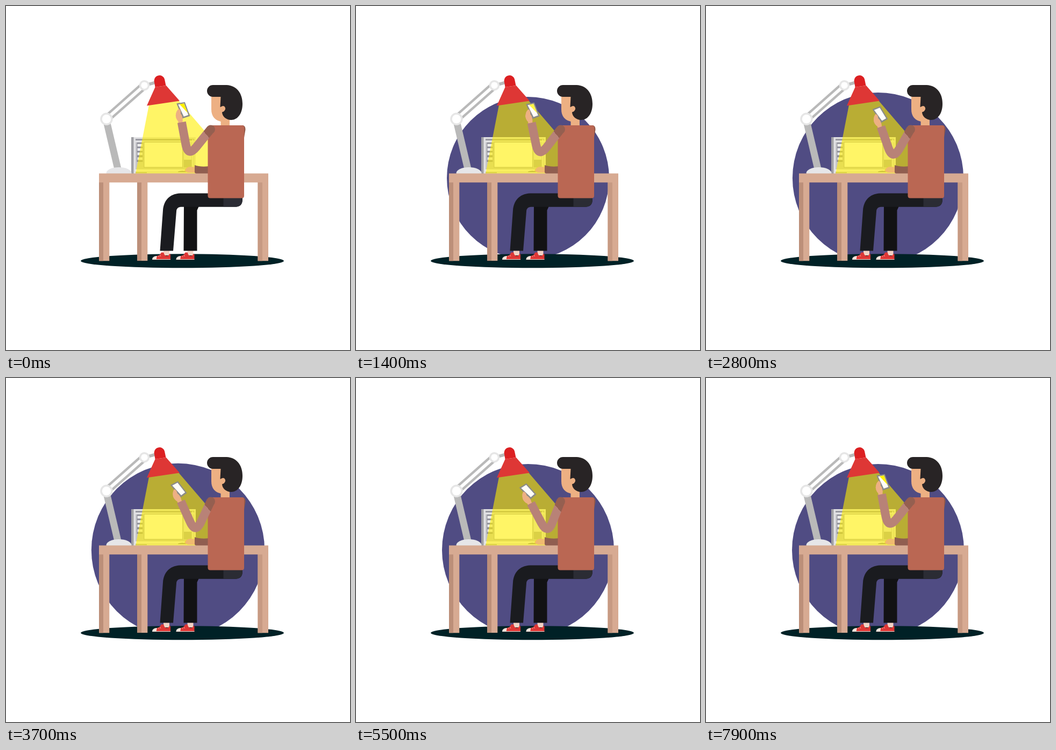
These frames come from a looping animation (640x640 px, 8000 ms). An HTML page:

```html
<!DOCTYPE html>
<html lang="en">
<head>
<meta charset="utf-8">
<title>Working at a desk</title>
<style>
html, body { margin: 0; width: 100%; height: 100%; overflow: hidden; background: #fff; }
svg { display: block; width: 100vw; height: 100vh; }
</style>
</head>
<body>
<svg viewBox="0 0 640 640">
  <defs>
    <linearGradient id="sleeve" gradientUnits="userSpaceOnUse" x1="362" y1="255" x2="390" y2="231">
      <stop offset=".5" stop-color="#b88277"/>
      <stop offset=".5" stop-color="#955f50"/>
    </linearGradient>
    <g id="shoe">
      <path d="M293 455H304V464H293Z" fill="#f3d3c4"/>
      <path d="M279 466L286 463L289 458.5H293.5Q294 465 299 465Q303 465 304 461L306 462V472H275Z" fill="#de3735"/>
      <path d="M272 471.500Q272 465.500 281 465L279.500 471.500Z" fill="#f6e4dc"/>
      <path d="M272 471.500H306" stroke="#f6e4dc"/>
      <path d="M283 464.500L285 467M286 463L288 466" stroke="#f6c9c2" stroke-width=".8"/>
    </g>
  </defs>

  <circle id="disc" cx="320" cy="320" r="0" fill="#504c83"/>
  <ellipse cx="328" cy="474.300" rx="189" ry="13" fill="#002126"/>

  <!-- screen -->
  <rect x="233" y="244" width="120" height="68" fill="#e1e1e3"/>
  <rect x="233" y="244" width="4.500" height="68" fill="#9f9fa3"/>
  <rect x="241" y="247" width="109" height="57" fill="#c6c6ca"/>
  <rect x="241" y="247.500" width="109" height="2" fill="#8c8c96"/>
  <rect x="241" y="251" width="109" height="2.500" fill="#e6e6e8"/>
  <rect x="243.500" y="254" width="11" height="36" fill="#8c8c96"/>
  <path d="M244.500 259H254M244.500 267H254M244.500 275H254M244.500 284H254" stroke="#eee" stroke-width="5"/>
  <rect x="256" y="252.500" width="73" height="48.500" fill="#aaaab0"/>
  <rect x="257.500" y="254" width="70.500" height="45.500" fill="#fff"/>
  <rect x="331" y="254" width="14" height="32" fill="#e3e3e6"/>
  <rect x="331" y="286" width="14" height="14" fill="#a5a5ac"/>
  <path d="M347.500 248V304" stroke="#eee" stroke-width="2"/>
  <path d="M241 305.500H353" stroke="#f4f4f4" stroke-width="3"/>
  <path d="M241 310H262" stroke="#a8a8ac" stroke-width="2"/>
  <path d="M320 308Q327 305 337 308V309H320Z" fill="#85858a"/>

  <!-- resting hand -->
  <path d="M332 307Q334 299 342 299L353 300V310H338Z" fill="#edb083"/>
  <path d="M266 184L321 176L376 240V312H241Z" fill="#fe0" fill-opacity=".6"/>
  <path d="M333 307Q335 299 343 299L353 300V310H339Z" fill="#edb083" fill-opacity=".75"/>
  <path d="M351 296Q362 300 378 298V313H358Q351 312 351 309Z" fill="#905e50"/>

  <!-- lamp -->
  <path d="M187 214L208 303" stroke="#b9b9b9" stroke-width="13"/>
  <ellipse cx="210" cy="311" rx="23.500" ry="11" fill="#e6e6e8"/>
  <path d="M187 210L257 148" stroke="#b9b9b9" stroke-width="15"/>
  <path d="M187 210L257 148" stroke="#fff" stroke-width="6"/>
  <path d="M257 148L279 142" stroke="#b9b9b9" stroke-width="5.500"/>
  <g fill="#fff" stroke="#e6e6e6" stroke-width="3.500">
    <circle cx="187" cy="210.300" r="10"/>
    <circle cx="257.500" cy="147.700" r="8"/>
  </g>
  <path d="M277.500 151L298 148L323 176.500L262 185.500Z" fill="#de3735"/>
  <path d="M277.500 151L275.500 139A10 10 0 0 1 295 136L297.500 148Z" fill="#dc2022"/>

  <!-- table -->
  <g fill="#d7aa92">
    <path d="M173 328H192.300V474.300H173ZM244 328H263.300V474H244ZM468.500 328H488V474.300H468.500Z"/>
    <path d="M173 328H181V474.300H173ZM244 328H252V474H244Z" fill="#bc8f79"/>
    <path d="M468.500 328H477V474.300H468.500Z" fill="#c79a83"/>
    <rect x="173" y="311.500" width="315" height="16.800"/>
  </g>

  <!-- legs -->
  <use href="#shoe"/>
  <use href="#shoe" x="44.500"/>
  <path d="M331 366H362L355.500 380V455.500H330.500Z" fill="#121214"/>
  <path d="M440 348.500H324C303 349.500 293.500 363 292 380L286.500 455.500H311L317 382Q317.500 374 325 373.700H428Q440 373 440 360Z" fill="#1a1b1f"/>
  <path d="M404.500 350H440V360Q439 373 428 373.500H404.500Z" fill="#2b2c34"/>

  <!-- torso and head -->
  <path d="M399.500 205H416V225H399.500Z" fill="#edb083"/>
  <path d="M438 222H441Q445.500 223 445.500 230L443 245H438Z" fill="#955a49"/>
  <path d="M380 222H439Q443 222 443 226V353Q443 357.500 438.500 357.500H380Q375.500 357.500 375.500 353V226Q375.500 222 380 222Z" fill="#ba6753"/>
  <path d="M382 165H412V211Q406 215.500 402 215.500Q382 212 382 192Z" fill="#edb083"/>
  <path d="M385 147H410C430 148 440 163 440 182C440 200 431 212 419 212C409 212 402 205 402 197L398.500 187L399.500 169H385A11 11 0 0 1 385 147Z" fill="#282425"/>
  <path d="M398 189Q403 184.500 406.500 187Q410 191 406 195.500Q403 198.500 400 196.500Z" fill="#edb083"/>

  <!-- raised arm -->
  <g id="hand">
    <path d="M-6 2L-6.500-2Q-11-7-11-13Q-10-22-5-25L0-23L2 2Z" fill="#edb083"/>
    <path d="M-9.500-35L6-37.500L15.500-11.500L1.500-7Z" fill="#8b8b89"/>
    <path d="M-6.500-33L4.500-35L12.500-13.500L4-10.500Z" fill="#fffef8"/>
    <path id="glow" d="M-4-33.500L4.500-35L11-17.500Z" fill="#fff000"/>
    <path d="M-6.500-2Q-11-7-11-13Q-10-22-5-25Q-1-23-2-16Q2-12 2-3Z" fill="#edb083"/>
  </g>
  <path id="arm" fill="none" stroke="url(#sleeve)" stroke-width="16"/>
  <circle cx="381" cy="229.500" r="8" fill="#955f50"/>
</svg>
<script>
const LOOP = 8000, STEP = 100;
const RADIUS = 160, GROW = 0.8333;
const SWING = 1600;
const SHOULDER = [381, 229];
const get = id => document.getElementById(id);
const disc = get('disc'), arm = get('arm'), hand = get('hand'), glow = get('glow');

const mix = (a, b, k) => a + (b - a) * k;
const easeInOut = u => u < 0.5 ? 4 * u ** 3 : 1 - 4 * (1 - u) ** 3;
const polar = ([x, y], length, degrees) => {
  const a = degrees * Math.PI / 180;
  return [x + length * Math.sin(a), y - length * Math.cos(a)];
};

// Linear growth, then a damped spring carrying on its speed.
function discRadius(ms) {
  const s = ms / 1000 - GROW;
  if (s < 0) return RADIUS * (1 + s / GROW);
  const push = 0.1 * RADIUS / GROW;
  return RADIUS + push * Math.sin(3 * Math.PI * s) * Math.exp(-0.96 * s);
}

function draw(ms) {
  disc.setAttribute('r', discRadius(ms).toFixed(2));

  const phase = ms % SWING / SWING;
  const low = easeInOut(1 - Math.abs(1 - 2 * phase));
  const upper = mix(39, 21.5, low), fore = mix(-10.5, -28, low);
  const elbow = polar(SHOULDER, 67, 180 + upper);
  const wrist = polar(elbow, 66, fore);
  const bendIn = polar(elbow, 24, fore), bendOut = polar(elbow, 24, upper);
  arm.setAttribute('d', `M${wrist}L${bendIn}Q${elbow} ${bendOut}L${SHOULDER}`);
  hand.setAttribute('transform', `translate(${wrist}) rotate(${mix(0, -22, low)})`);
  glow.setAttribute('opacity', Math.max(0, 1 - 4.5 * low));
}

const start = performance.now();
function tick() {
  const ms = (performance.now() - start) % LOOP;
  draw(Math.floor(ms / STEP) * STEP);
  requestAnimationFrame(tick);
}
tick();
</script>
</body>
</html>
```
